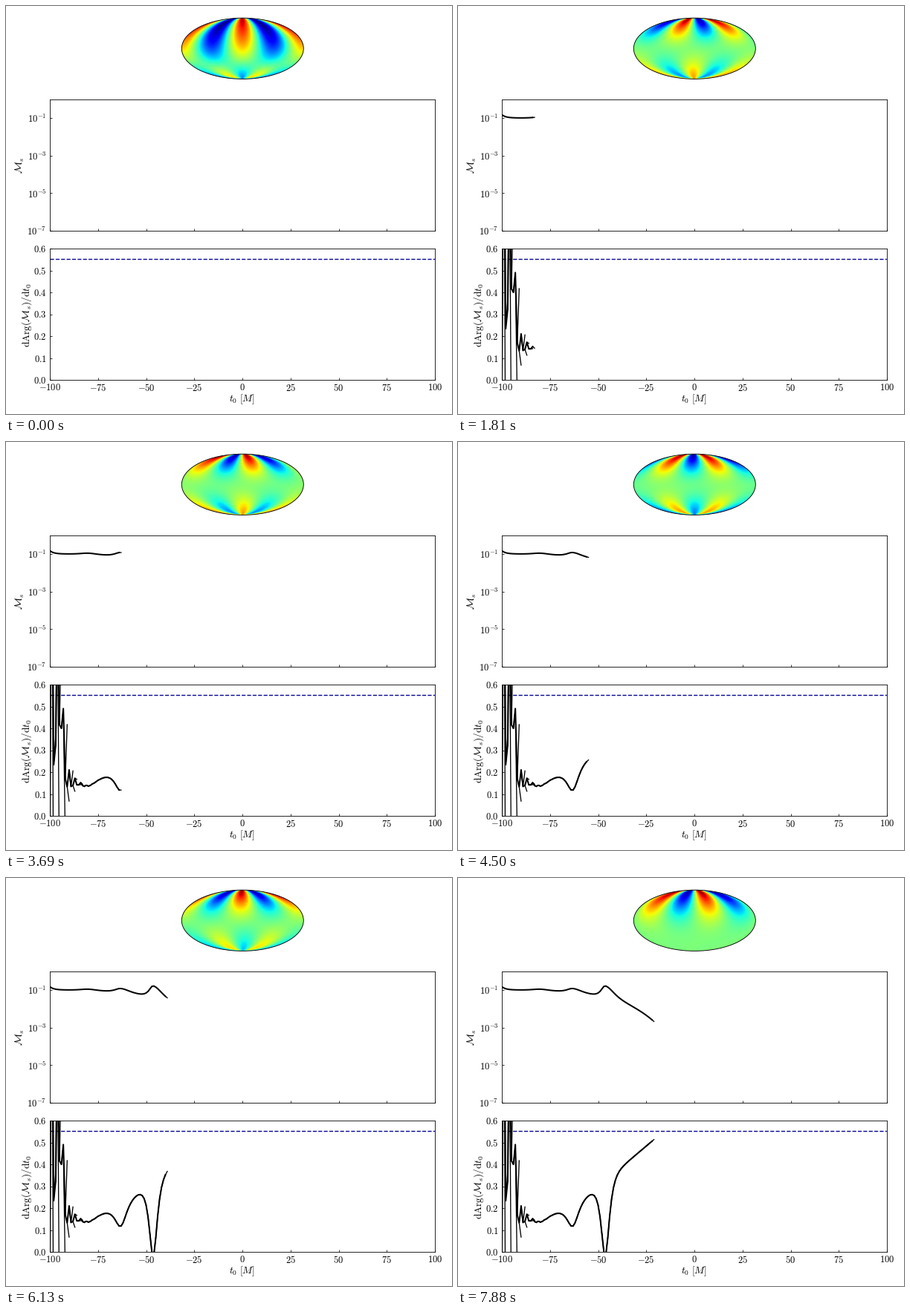
A matplotlib script for the animation above (8 s loop, 600 px wide and 550 px high).

```python
import numpy as np
import matplotlib.pyplot as plt
from matplotlib.animation import FuncAnimation
from matplotlib.patches import Ellipse

W, H, DPI = 600, 550, 100
STEPS = 80          # one step per unit of t0
TICKS = 128         # the display refreshes 16 times a second

plt.rcParams["mathtext.fontset"] = "cm"
fig = plt.figure(figsize=(W / DPI, H / DPI), dpi=DPI, facecolor="white")

step = np.arange(STEPS)
t0 = step - 100.0


def sech(x):
    return 1 / np.cosh(x)


def sigmoid(x):
    return 1 / (1 + np.exp(-x))


# Phase rate: a bending ramp with three dips, each deeper and narrower
rate = .153 + .0675 * np.log1p(np.exp((t0 + 69) / 9))
# Mismatch exponent: a steepening fall with a skewed bump at every dip
exponent = -.95 - 1.72 * np.exp((t0 + 21) / 19) + .16 * np.exp(-step / 2)
for k in range(3):
    u = t0 + 80 - 16.85 * k
    rate -= .033 * 3.25 ** k * sech(u / (3.8 * .69 ** k))
    width = np.where(u < 0, 1.8 * 1.45 ** (2 - k), 4.1)
    exponent += .63 * .36 ** (2 - k) * sech(u / width)
mismatch = 10 ** exponent

# Early wobble, and the one-sided slope at the moving end
rate += .4 * sigmoid((7 - step) / .6)
rate += 1.2 * np.exp(-step / 3.2) * np.cos(2 * np.pi * (step - 1) / 3)
tip = rate + 1.2 * np.exp(-(step / 7.5) ** 2) * np.cos(2.35 * (step - 9))

# The northern pattern turns with the phase rate, the southern one speeds up
total = np.cumsum(rate)
north_phase = np.where(step < 7, np.radians(165) * step / 7,
                       np.radians(165) + total - total[7])
age = np.maximum(step - 7, 0)
south_phase = np.radians(180 + 16 * age + .08 * age ** 2)
south_amp = (.5 + .5 * np.exp(-((step - 54) / 5) ** 2)) * sigmoid((63 - step) / 3)
burst = np.clip(1 - step / 5, 0, 1)
spread = .15 + 3 * burst + 2.2 * np.clip((step - 58) / 21, 0, 1)

# Mollweide grid
gx, gy = np.meshgrid(np.linspace(-1, 1, 330), np.linspace(-1, 1, 166))
aux = np.arcsin(gy)
sin_lat = (2 * aux + np.sin(2 * aux)) / np.pi
lon = np.pi * np.clip(gx / np.maximum(np.cos(aux), 1e-6), -1, 1)


def polar_wave(height, phase, power, a):
    """Two-armed wave, strongest at the pole where height is 1."""
    fall = ((1 + height) / 2) ** power * (height + a) / (1 + a)
    return fall * np.cos(2 * lon - phase)


def sky(n):
    wave = polar_wave(sin_lat, north_phase[n], 2 - 1.5 * burst[n], spread[n])
    wave += south_amp[n] * polar_wave(-sin_lat, south_phase[n], 2, .15)
    wave -= .12 * burst[n] * np.cos(aux)
    return wave / np.abs(wave).max()


# Layout in pixels, measured from the top left
def pixel_axes(x0, y0, x1, y1):
    return fig.add_axes([x0 / W, 1 - y1 / H, (x1 - x0) / W, (y1 - y0) / H])


def label(x, y, text, **kw):
    fig.text(x / W, 1 - y / H, text, fontsize=9.6, ha="center", va="center", **kw)


globe = pixel_axes(236.3, 16.2, 400.3, 98.4)
globe.set_axis_off()
image = globe.imshow(sky(0), cmap="jet", vmin=-1, vmax=1, origin="lower",
                     extent=[-1, 1, -1, 1], aspect="auto", interpolation="bilinear")
rim = Ellipse((0, 0), 2, 2, fill=False, ec="black", lw=.65, clip_on=False)
globe.add_patch(rim)
image.set_clip_path(rim)

top = pixel_axes(59, 126, 577, 303)
bottom = pixel_axes(59, 327, 577, 504)
ticks = np.arange(-100, 101, 25)
for ax in (top, bottom):
    ax.set_xlim(-100, 100)
    ax.set_xticks(ticks)
    ax.tick_params(direction="in", length=2.2, width=.55, labelsize=9)
    ax.tick_params(axis="x", pad=2.6)
    ax.tick_params(axis="y", pad=3.2)
    for spine in ax.spines.values():
        spine.set_linewidth(.6)

top.set_yscale("log")
top.set_ylim(1e-7, 1)
powers = range(-7, 0, 2)
top.set_yticks([10.0 ** p for p in powers], [f"$10^{{{p}}}$" for p in powers])
top.minorticks_off()
top.tick_params(labelbottom=False)

bottom.set_ylim(0, .6)
bottom.set_yticks(np.arange(7) / 10, [f"${v / 10:.1f}$" for v in range(7)])
bottom.set_xticklabels([f"${v}$" for v in ticks])
bottom.axhline(.5525, color="#000096", lw=1, ls="--")

label(317.5, 530, r"$t_0\ [M]$")
label(19, 215, r"$\mathcal{M}_s$", rotation=90)
label(28.5, 416.5, r"$\mathrm{dArg}(\mathcal{M}_s)/\mathrm{d}t_0$", rotation=90)


def stroke(ax, width):
    return ax.plot([], [], color="black", lw=width, solid_joinstyle="round")[0]


top_line, top_tip = stroke(top, 1.45), stroke(top, .95)
rate_line, rate_tips = stroke(bottom, 1.45), stroke(bottom, .95)


def tips(n):
    """Separate end strokes of every step so far."""
    k = np.arange(1, n + 1)
    gap = np.full(n, np.nan)
    return (np.column_stack([t0[k - 1], t0[k], gap]).ravel(),
            np.column_stack([rate[k - 1], tip[k], gap]).ravel())


def draw(tick):
    n = int((tick + .5) * STEPS / TICKS)
    image.set_data(sky(n))
    top_line.set_data(t0[:n], mismatch[:n])
    last = slice(max(n - 1, 0), n + 1 if n else 0)
    top_tip.set_data(t0[last], mismatch[last])
    rate_line.set_data(t0[:n], rate[:n])
    rate_tips.set_data(*tips(n))
    return image, top_line, top_tip, rate_line, rate_tips


anim = FuncAnimation(fig, draw, frames=TICKS, interval=8000 / TICKS,
                     init_func=lambda: draw(0), repeat=True, repeat_delay=0)
plt.show()
```
